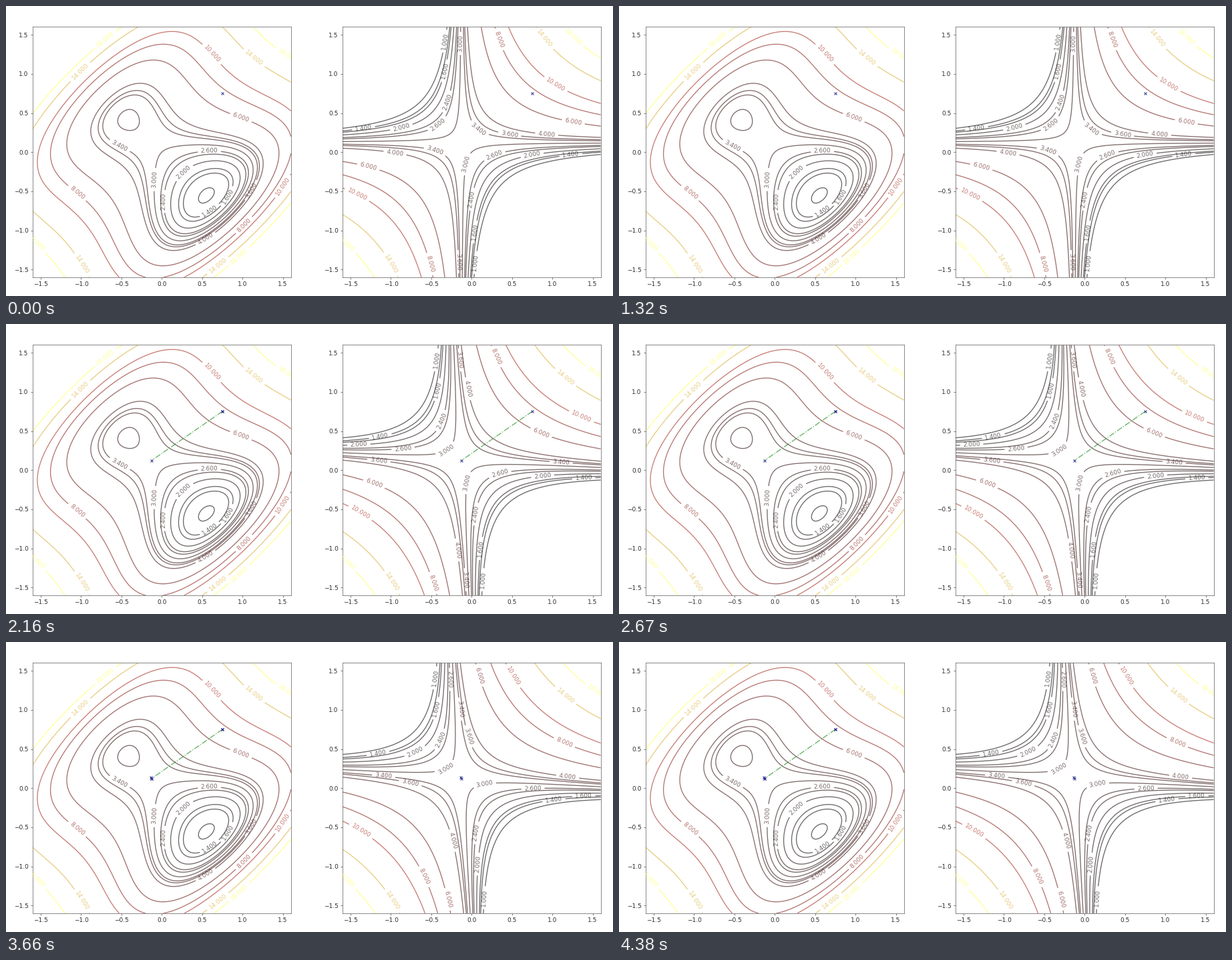
Recreate the animation shown at these times as a matplotlib script. Size 909x435 px, loop 4.41 s.

```python
import numpy as np
import matplotlib.pyplot as plt
from matplotlib.animation import FuncAnimation
from matplotlib.colors import LinearSegmentedColormap

W, H, DPI = 909, 435, 64
LAYOUT_DPI = 98.57          # contour labels are placed at this resolution
FRAMES, INTERVAL = 49, 90
STEP_FRAMES = (0, 15, 38)   # frame at which each Newton iterate appears
LIM = 1.6

plt.rcParams.update({
    "font.family": "DejaVu Sans",
    "font.size": 10.15,
    "lines.linewidth": 1.5,
    "lines.markersize": 5.6,
    "contour.algorithm": "mpl2014",
    "axes.edgecolor": "#5c5c5c",
    "xtick.color": "#4c4c4c",
    "ytick.color": "#4c4c4c",
    "xtick.labelcolor": "#2c2c2c",
    "ytick.labelcolor": "#2c2c2c",
})

LEVELS = (1, 1.4, 1.6, 2, 2.4, 2.6, 3, 3.4, 3.6, 4, 6, 8, 10, 14, 18)
CMAP = LinearSegmentedColormap.from_list("heat", [
    (0.0, "#060606"), (0.18, "#3c0f0e"), (0.29, "#661612"),
    (0.53, "#a4281c"), (0.765, "#d9ad33"), (1.0, "#ffff59")])


def f(x, y):
    return (x - y)**4 + 8*x*y - x + y + 3


def gradient(x, y):
    c = 4*(x - y)**3
    return np.array([c + 8*y - 1, -c + 8*x + 1])


def hessian(x, y):
    d = 12*(x - y)**2
    return np.array([[d, 8 - d], [8 - d, d]])


def quadratic_model(p, x, y):
    """Second-order Taylor expansion of f around p."""
    g, h = gradient(*p), hessian(*p)
    dx, dy = x - p[0], y - p[1]
    curve = h[0, 0]*dx**2 + 2*h[0, 1]*dx*dy + h[1, 1]*dy**2
    return f(*p) + g[0]*dx + g[1]*dy + curve/2


def make_axes(left):
    ax = fig.add_axes([left/W, 1 - 407/H, 386.6/W, 375.5/H],
                      label=str(len(fig.axes)))
    ax.set(xlim=(-LIM, LIM), ylim=(-LIM, LIM))
    ticks = np.arange(-1.5, 1.6, 0.5)
    ax.set_xticks(ticks)
    ax.set_yticks(ticks)
    return ax


def draw_contours(ax, z):
    cs = ax.contour(X, Y, z, levels=LEVELS, cmap=CMAP, alpha=0.6)
    # Place with a roomier font, then show the labels at the normal size.
    for text in ax.clabel(cs, fmt="%1.3f", fontsize=11.2, inline_spacing=5):
        text.set_fontsize(plt.rcParams["font.size"])


def draw_step(ax, points):
    """Mark the given iterates and join them with a dash-dotted line."""
    xs, ys = np.transpose(points)
    line, = ax.plot(xs, ys, "-.", color="green", alpha=0.6)
    marks, = ax.plot(xs, ys, "x", color="#20208c", alpha=0.8, mew=1.3)
    return line, marks


iterates = [np.array([0.75, 0.75])]
for _ in range(2):
    p = iterates[-1]
    iterates.append(p - np.linalg.solve(hessian(*p), gradient(*p)))

fig = plt.figure(figsize=(W/DPI, H/DPI), dpi=DPI, facecolor="white")
fig.set_dpi(LAYOUT_DPI)
X, Y = np.meshgrid(*[np.linspace(-LIM, LIM, 321)]*2)

left_ax = make_axes(40)
draw_contours(left_ax, f(X, Y))

right_axes, trail = [], []
for k, p in enumerate(iterates):
    ax = make_axes(504)
    draw_contours(ax, quadratic_model(p, X, Y))
    step = iterates[max(k - 1, 0):k + 1]
    draw_step(ax, step)
    right_axes.append(ax)
    trail.append(draw_step(left_ax, step))
fig.set_dpi(DPI)


def update(frame):
    now = sum(frame >= start for start in STEP_FRAMES) - 1
    for k, (ax, artists) in enumerate(zip(right_axes, trail)):
        ax.set_visible(k == now)
        for artist in artists:
            artist.set_visible(k <= now)
    return []


update(0)
anim = FuncAnimation(fig, update, frames=FRAMES, interval=INTERVAL,
                     repeat=True, repeat_delay=0, blit=False)
plt.show()
```
